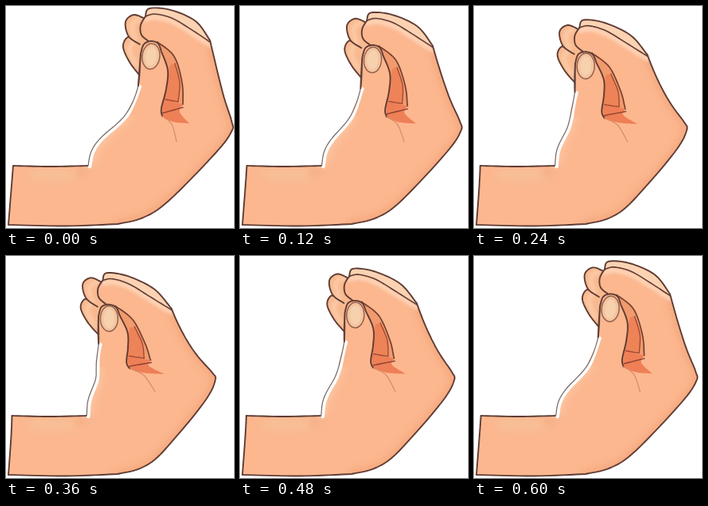
Write an HTML page with a canvas that moves like this. It is 286 px wide and 278 px high and loops after 720 ms.

```html
<!DOCTYPE html>
<html lang="en">
<head>
<meta charset="utf-8">
<title>Hand gesture</title>
<style>
html, body { margin: 0; width: 100%; height: 100%; overflow: hidden; background: #fff; }
canvas { display: block; }
</style>
</head>
<body>
<canvas id="stage" width="286" height="278"></canvas>
<script>
const ctx = document.getElementById('stage').getContext('2d');
const STEP = 120, STEPS = 6;
const INK = '#5f3c34', SKIN = '#fcb78f', LIGHT = '#fdd5b6', SHADE = '#ee9568';

let bend = 0;

// The hand leans left above a soft hinge that is broader on the right
function warp([x, y]) {
  const hinge = 130 + 45 * Math.exp(-(((x - 195) / 55) ** 2));
  const spread = 20 + 0.22 * Math.max(0, x - 140);
  const lean = 54 / (1 + Math.exp((y - hinge) / spread));
  const sink = (3 + 0.09 * x) * Math.tanh(Math.max(0, 150 - y) / 80);
  return [x - bend * lean, y + bend * sink];
}

// Catmull-Rom spline, sampled and then bent
function curve(path, p, join) {
  const spline = (a, b, c, d, t) =>
    b + t / 2 * (c - a + t * (2 * a - 5 * b + 4 * c - d + t * (3 * (b - c) + d - a)));
  for (let i = 0; i < p.length - 1; i++) {
    const b = p[i], c = p[i + 1], a = p[i - 1] || b, d = p[i + 2] || c;
    for (let t = 0; t <= 1; t += 0.125) {
      const q = warp([0, 1].map(k => spline(a[k], b[k], c[k], d[k], t)));
      if (i || t || join) path.lineTo(...q); else path.moveTo(...q);
    }
  }
}

function shape(...runs) {
  const path = new Path2D();
  runs.forEach((run, i) => curve(path, run, i > 0));
  return path;
}

function stroke(path, color = INK, width = 1.9) {
  ctx.strokeStyle = color;
  ctx.lineWidth = width;
  ctx.stroke(path);
}

function fill(path, color) {
  ctx.fillStyle = color;
  ctx.fill(path);
}

function glow(run, color, width, blur, alpha) {
  ctx.save();
  ctx.filter = `blur(${blur}px)`;
  ctx.globalAlpha = alpha;
  stroke(shape(run), color, width);
  ctx.restore();
}

const wrist = [[3, 274], [9, 200]];
const wristTop = [[9, 200], [55, 201], [103, 200]];
const thumbLeft = [[103, 200], [107, 182], [119, 165], [150, 136], [166, 100], [169, 60]];
const thumbTip = [[169, 60], [173, 48], [182, 44], [191, 47], [195, 57]];
const thumbRight = [[195, 57], [203, 80], [201, 104], [195, 128], [196, 138]];
const indexTip = [[179, 44], [170, 36], [169, 24], [175, 13]];
const topEdge = [[175, 13], [180, 3], [207, 5], [238, 19], [256, 43]];
const back = [[256, 43], [272, 109], [283, 144], [283, 157], [263, 184], [204, 244], [172, 265], [140, 273]];
const base = [[140, 273], [75, 275.5], [3, 274]];
const knuckles = [[175, 13], [187, 10], [208, 15], [232, 29], [256, 45]];
const indexLow = [[190, 45], [211, 63], [221, 96], [222, 123]];
const upperFinger = [[173, 15], [160, 11], [150, 20], [154, 38], [168, 48]];
const lowerFinger = [[164, 45], [153, 39], [147, 51], [155, 70], [167, 86]];
const notch = [[222, 123], [218, 133], [230, 147]];
const fold = [[196, 138], [208, 148], [214, 170]];

function drawFingers() {
  for (const finger of [lowerFinger, upperFinger]) {
    fill(shape(finger, [[180, 60], [180, 20]]), '#f9b98f');
    glow(finger.slice(1, 4).map(([x, y]) => [x + 8, y + 4]), LIGHT, 6, 2, 0.6);
    stroke(shape(finger));
  }
}

function drawHollow() {
  fill(shape(thumbRight, [[196, 138], [222, 123]], [...indexLow].reverse()), '#f19a6d');
  const inner = [[212, 72], [218, 96], [216, 120]];
  fill(shape(inner, [[216, 120], [198, 116], [206, 74]]), '#ee8358');
  fill(shape([[197, 118], [222, 123]], notch, [[230, 147], [210, 145], [196, 138]]), '#ee7f56');
  stroke(shape(inner, [[216, 120], [200, 117]]), '#a04a35', 1.4);
  stroke(shape([[197, 134], [222, 127]]), '#8a3f30', 1.4);
  stroke(shape(indexLow), '#74402f', 1.7);
}

function drawNail() {
  const [x, y] = warp([182, 63]);
  const oval = (rx, ry) => {
    const path = new Path2D();
    path.ellipse(x, y, rx, ry, 0.12 * (1 - bend), 0, 2 * Math.PI);
    return path;
  };
  fill(oval(11, 16), '#f3c4a0');
  fill(oval(7, 12), '#f7d0ae');
  stroke(oval(11, 16), '#94614c', 1.5);
}

function draw() {
  ctx.fillStyle = '#fff';
  ctx.fillRect(0, 0, 286, 278);
  ctx.lineCap = ctx.lineJoin = 'round';
  drawFingers();

  const hand = shape(wristTop, thumbLeft, indexTip, topEdge, back, base, wrist);
  fill(hand, SKIN);
  ctx.save();
  ctx.clip(hand);
  glow(back, SHADE, 9, 5, 0.5);
  glow([[35, 211], [85, 211]], '#f3c69c', 14, 6, 0.6);
  glow([[92, 208], [108, 202]], SHADE, 6, 4, 0.6);
  glow(thumbLeft.slice(0, 4), LIGHT, 16, 6, 0.5);
  fill(shape(topEdge, [...knuckles].reverse()), '#fbd3b3');
  glow(knuckles.map(([x, y]) => [x, y + 4]), '#ffe3cb', 5, 2, 0.8);
  ctx.restore();

  drawHollow();
  stroke(shape(indexTip));
  stroke(shape(knuckles), INK, 1.6);
  stroke(shape(topEdge, back, base, wrist, wristTop));

  fill(shape(thumbLeft.slice(3), thumbTip, thumbRight), SKIN);
  stroke(shape(thumbLeft.slice(0, 5).map(([x, y]) => [x + 2, y + 1])), '#fff', 4.5);
  stroke(shape(thumbLeft), '#756763', 1.2);
  stroke(shape(thumbLeft.slice(4), thumbTip, thumbRight));
  stroke(shape(fold), '#d88a67', 1.2);
  drawNail();
}

function tick(now) {
  const step = Math.floor(now / STEP) % STEPS;
  bend = (1 - Math.cos(2 * Math.PI * step / STEPS + 0.1)) / 2;
  draw();
  requestAnimationFrame(tick);
}
tick(0);
</script>
</body>
</html>
```
